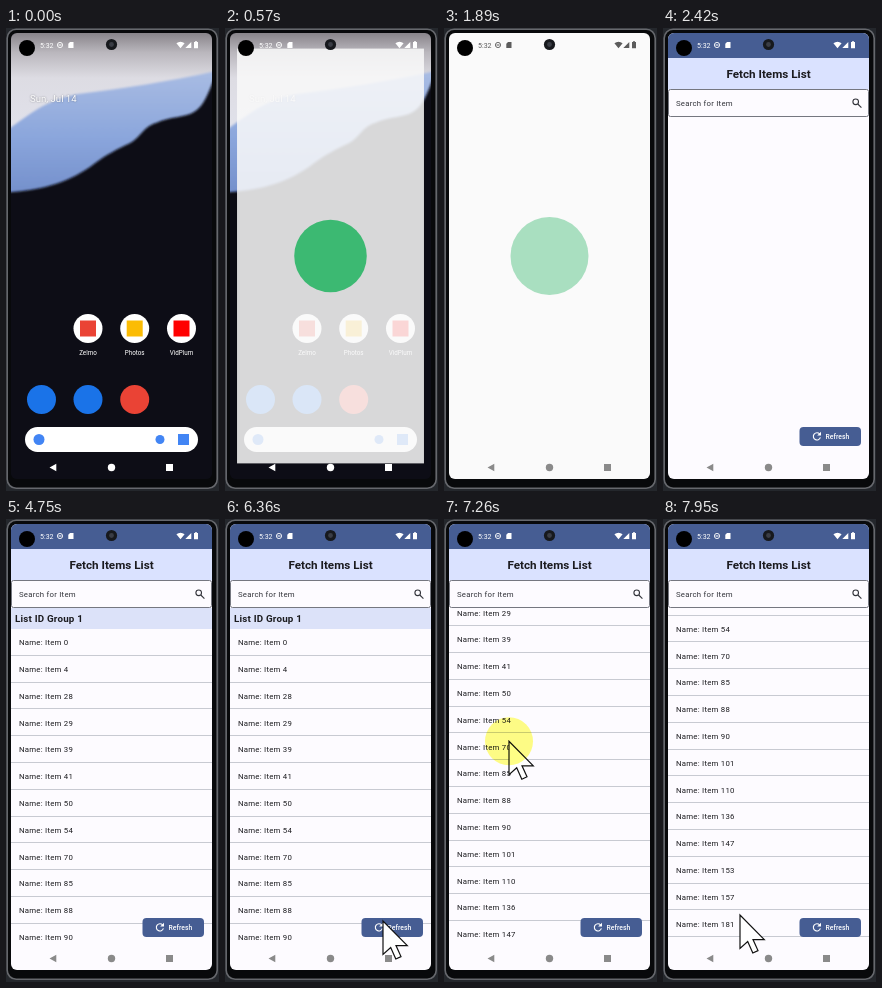
An HTML page for the animation above (8000 ms loop, 213x463 px).

```html
<!DOCTYPE html>
<html lang="en">
<head>
<meta charset="utf-8">
<title>Fetch Items List</title>
<style>
  html, body { margin: 0; width: 100%; height: 100%; overflow: hidden; background: #24272c; }
  svg { display: block; width: 213px; height: 463px; font-family: Roboto, "Open Sans", sans-serif; }
  .body { font-size: 7.8px; letter-spacing: .24px; fill: #1b1b1f; }
  .label { font-size: 6.3px; fill: #fff; text-anchor: middle; }
  #press { mix-blend-mode: multiply; }
</style>
</head>
<body>
<svg viewBox="0 0 213 463">
  <defs>
    <clipPath id="screenClip"><rect x="5" y="5" width="201" height="446" rx="6"/></clipPath>
    <clipPath id="listClip"><rect x="5" y="89" width="201" height="339"/></clipPath>
    <linearGradient id="sky" x2="0" y2="1">
      <stop offset="0" stop-color="#88848a"/>
      <stop offset=".13" stop-color="#bab7bd"/>
      <stop offset=".3" stop-color="#dddce3"/>
      <stop offset="1" stop-color="#e4e7f2"/>
    </linearGradient>
    <linearGradient id="wave" x2="0" y2="1">
      <stop offset="0" stop-color="#a9bce3"/>
      <stop offset=".5" stop-color="#8ba6dc"/>
      <stop offset="1" stop-color="#708cc9"/>
    </linearGradient>
    <filter id="soft" x="-20%" y="-20%" width="140%" height="140%"><feGaussianBlur stdDeviation="1.2"/></filter>
  </defs>

  <!-- phone body -->
  <rect width="213" height="463" fill="#24272c"/>
  <rect x="1.2" y="1.2" width="210" height="459" rx="9" fill="#08090b" stroke="#66686d" stroke-width="1.6"/>

  <g clip-path="url(#screenClip)">
    <g id="home">
      <rect x="5" y="5" width="201" height="446" fill="#0b0c15"/>
      <rect x="5" y="5" width="201" height="150" fill="url(#sky)"/>
      <path filter="url(#soft)" fill="url(#wave)" d="M0 103C24 86 40 72 72 66C120 60 160 54 210 43V85L150 120L60 175H0Z"/>
      <path filter="url(#soft)" fill="#0b0c15" d="M-5 165C30 163 58 157 84 139C98 128 106 124 120 117C134 112 136 99 150 95C165 88 178 90 188 84C198 78 202 66 209 48H220V470H-5Z"/>
      <text x="24" y="73.5" font-size="9.6" fill="#fff" style="text-shadow:0 0 2px #0006">Sun, Jul 14</text>
      <g id="apps"></g>
      <rect x="19" y="399" width="173" height="25" rx="12.5" fill="#fff"/>
      <circle cx="33" cy="411.5" r="5.5" fill="#4285f4"/>
      <circle cx="154" cy="411.5" r="4.5" fill="#4285f4"/>
      <rect x="172" y="406" width="11" height="11" fill="#4285f4"/>
    </g>

    <g id="app">
      <rect x="5" y="5" width="201" height="446" fill="#fdfbff"/>
      <rect x="5" y="5" width="201" height="25" fill="#465d93"/>
      <rect x="5" y="30" width="201" height="31.5" fill="#dae2ff"/>
      <text x="105.5" y="50" font-size="11.7" font-weight="700" text-anchor="middle" fill="#1b1b1f">Fetch Items List</text>
      <rect x="5.5" y="61.5" width="200" height="27" rx="2" fill="#fdfbff" stroke="#757780"/>
      <text class="body" x="13" y="78.2" style="fill:#33343b">Search for Item</text>
      <g fill="none" stroke="#33343b" stroke-width="1.1">
        <circle cx="192.7" cy="73.8" r="2.8"/><path d="M194.8 76L198.4 79.6"/>
      </g>
      <g clip-path="url(#listClip)"><g id="list">
        <rect x="5" y="89" width="201" height="21" fill="#dce2f9"/>
        <text x="9" y="103" font-size="9.8" font-weight="700" letter-spacing=".2" fill="#1b1b1f">List ID Group 1</text>
      </g></g>
      <rect x="136.5" y="399" width="61.5" height="19" rx="4" fill="#465d93"/>
      <path d="M156.7 406A3.6 3.6 0 1 0 157.4 409.4" fill="none" stroke="#fff" stroke-width="1.1"/>
      <path d="M158 403.8V407.6H154.2Z" fill="#fff"/>
      <text x="162.5" y="411" font-size="6.8" font-weight="500" letter-spacing=".05" fill="#fff">Refresh</text>
    </g>

    <g id="splash">
      <rect id="sheet" x="5" y="5" width="201" height="446" fill="#fafafa"/>
      <circle id="logo" cx="105.5" cy="228" r="39" fill="#3cb972"/>
    </g>

    <g id="status" fill="currentColor">
      <text x="34" y="19.8" font-size="7">5:32</text>
      <circle cx="54" cy="17" r="2.6" fill="none" stroke="currentColor" stroke-width=".9"/>
      <path d="M52.5 16.6H55.5V17.5H52.5ZM64 14H67.5V20H62.3V15.8ZM170.4 15.3Q174.5 12 178.6 15.3L174.5 20.3ZM185.3 14V20H179.3ZM189 14V13.3H191V14H192V20.3H188V14Z"/>
    </g>
    <g id="nav" fill="currentColor">
      <path d="M50.3 435.8V443.2L43.5 439.5ZM160 436H167V443H160Z"/>
      <circle cx="105.5" cy="439.5" r="3.7"/>
    </g>
  </g>

  <circle cx="21" cy="20" r="8" fill="#000"/>
  <circle cx="105.5" cy="16.5" r="5.6" fill="#17191d"/>
  <circle cx="105.5" cy="16.5" r="2.4" fill="#3a3d45"/>

  <path id="cursor" d="M0 0V33.5L7.7 26.5L12.8 38L18 35.6L13 24.6H24.3Z" fill="#fff" stroke="#111" stroke-width="1.2"/>
  <circle id="press" r="24" fill="#ffff85"/>
</svg>
<script>
const $ = id => document.getElementById(id);
const show = (id, on) => $(id).style.display = on ? '' : 'none';

// Launcher icons: x, y, disc, inner square, label
const apps = [
  [82, 300.5, '#fff', '#ea4335', 'Zelmo'], [128.7, 300.5, '#fff', '#fbbc04', 'Photos'],
  [175.5, 300.5, '#fff', '#f00', 'VidPlum'],
  [35.5, 371.5, '#1a73e8'], [82, 371.5, '#1a73e8'], [128.7, 371.5, '#ea4335']
];
$('apps').innerHTML = apps.map(([x, y, disc, mark, name]) =>
  `<circle cx="${x}" cy="${y}" r="14.5" fill="${disc}"/>` + (name ?
  `<rect x="${x - 8}" y="${y - 8}" width="16" height="16" fill="${mark}"/>
   <text class="label" x="${x}" y="327">${name}</text>` : '')).join('');

const items = [0, 4, 28, 29, 39, 41, 50, 54, 70, 85, 88, 90, 101, 110, 136, 147, 153, 157, 181];
const rowHeight = 26.8;
$('list').innerHTML += items.map((n, i) => {
  const y = 110 + i * rowHeight;
  return `<text class="body" x="13" y="${y + 16.1}">Name: Item ${n}</text>
    <rect x="5" y="${Math.floor(y + rowHeight - .5)}" width="201" height="1" fill="#c8cad2"/>`;
}).join('');

// Number of steps passed in a span of n steps from a to b
const step = (t, a, b, n) => t < a ? 0 : Math.min(n, Math.floor((t - a) / (b - a) * (n - 1) + 1.2));
const at = (list, i) => list[Math.min(i, list.length - 1)];

const spans = [[5420, 5960, 9], [6360, 6850, 8], [6990, 7740, 12], [7810, 7950, 3]];
function snap(t) {
  const span = spans.filter(s => t >= s[0]).pop();
  if (!span) return 0;
  const [a, b, n] = span;
  return a + (step(t, a, b, n) - 1) * (b - a) / (n - 1);
}

function follow(keys, t) {
  const i = keys.findIndex(k => k[0] > t);
  if (i < 0) return keys[keys.length - 1].slice(1);
  if (!i) return keys[0].slice(1);
  const p = keys[i - 1], q = keys[i], u = (t - p[0]) / (q[0] - p[0]);
  return p.slice(1).map((v, j) => v + (q[j + 1] - v) * u);
}
const pointer = [[5420, 208, 343], [5690, 190, 390], [5960, 165, 409], [6360, 158, 402],
  [6640, 84, 314], [6850, 68, 350], [6990, 68, 365], [7126, 66, 325], [7263, 65, 222],
  [7400, 64, 205], [7740, 63, 256], [7810, 66, 300], [7950, 77, 396]];
const scroll = [[7058, 0], [7126, 25], [7263, 110], [7400, 165], [7530, 190], [7740, 201]];

function draw(t) {
  const opening = step(t, 500, 990, 7), closing = step(t, 1890, 2420, 9);
  const size = at([0, .8, .93, .975, .992, 1], opening);
  const cover = at([1, 1, 1, 1, .7, .4, .15, 0], closing);
  show('home', opening < 7);
  show('app', closing > 3);
  show('splash', opening && cover);
  $('splash').setAttribute('transform', `translate(105.5 228) scale(${size}) translate(-105.5 -228)`);
  $('splash').setAttribute('opacity', cover);
  $('sheet').setAttribute('opacity', at([0, .4, .86, 1], opening));
  $('logo').setAttribute('opacity', closing ? at([1, .43, .15, 0], closing) : at([0, .6, 1], opening));

  const tint = t < 1440 ? '#fff' : t < 1480 ? '#c0c0c0' : '#8a8a8a';
  $('nav').style.color = tint;
  $('status').style.color = closing > 4 ? '#fff' : t < 1480 ? tint : '#5c5c5c';

  const now = snap(t), move = `translate(${follow(pointer, now)})`;
  show('list', t >= 4750);
  $('list').setAttribute('transform', `translate(0 ${-Math.round(follow(scroll, now)[0])})`);
  show('cursor', t >= 5420);
  show('press', t >= 6990 && t < 7400);
  $('cursor').setAttribute('transform', move);
  $('press').setAttribute('transform', move);
}

function loop() {
  draw(performance.now() % 8000);
  requestAnimationFrame(loop);
}
loop();
</script>
</body>
</html>
```
